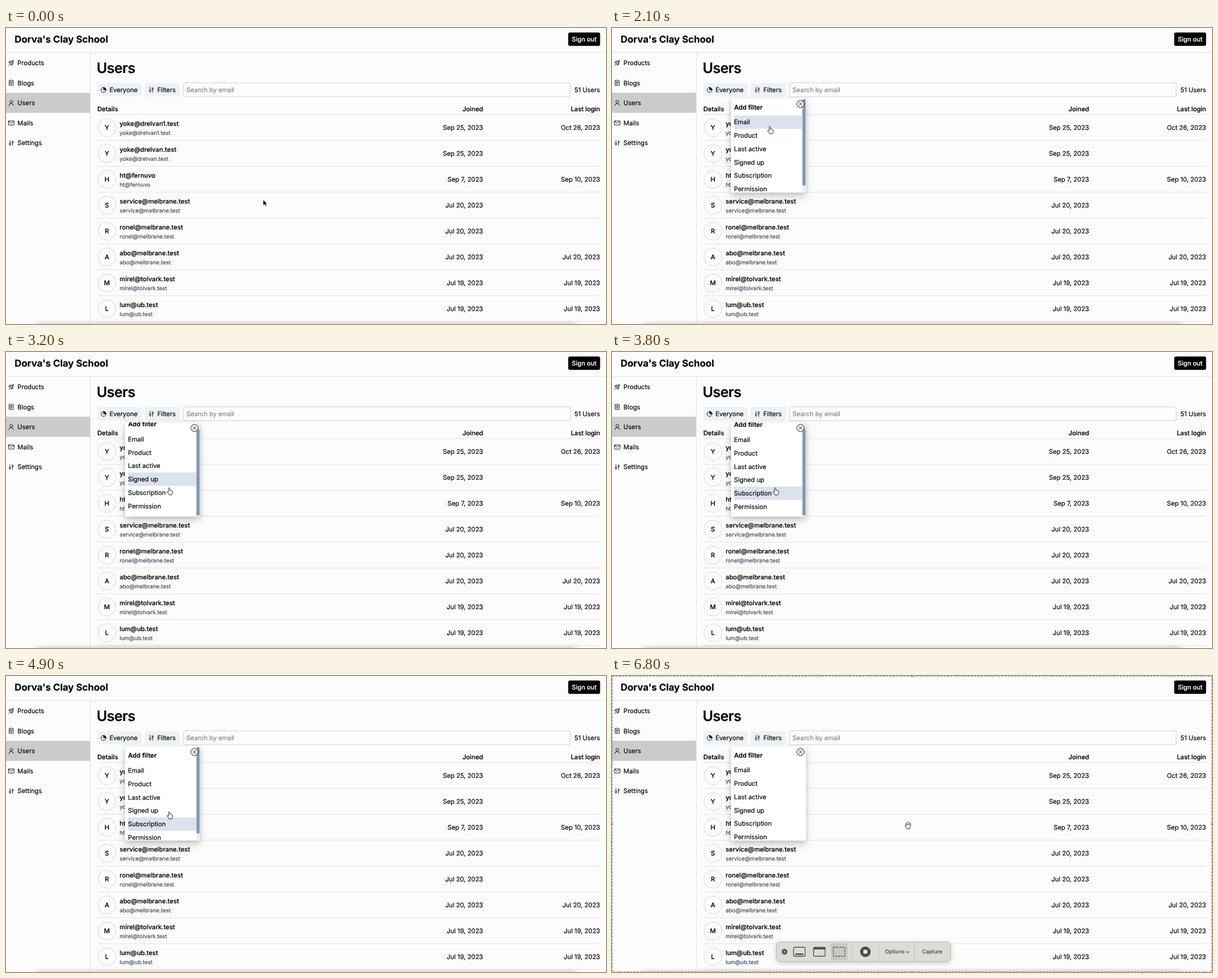
An HTML page for the animation above (7 s loop, 1064x526 px).

```html
<!DOCTYPE html>
<html lang="en">
<head>
<meta charset="utf-8">
<title>User filters</title>
<style>
  html, body { margin: 0; width: 100%; height: 100%; overflow: hidden; background: #fcfcfc; }
  svg { display: block; width: 100vw; height: 100vh; }
  text {
    font-family: Inter, "Open Sans", sans-serif; white-space: pre;
    text-rendering: geometricPrecision; stroke-width: .22;
  }
  .icon { fill: none; stroke: #18181b; stroke-width: 1; stroke-linejoin: round; stroke-linecap: round; }
  .line { stroke: #e2e2e5; stroke-width: 1; }
  .panel { fill: #fff; filter: drop-shadow(0 7px 7px rgba(0,0,0,.17)) drop-shadow(0 1px 3px rgba(0,0,0,.13)); }
  .bottom { fill: #000; opacity: .48; filter: blur(6px); }
  .pointer { fill: #fff; stroke: #111; stroke-width: .9; stroke-linejoin: round; }
  .arrow { fill: #000; stroke: #fff; stroke-width: .8; }
</style>
</head>
<body>
<svg id="stage" viewBox="0 0 1064 526" xmlns="http://www.w3.org/2000/svg"></svg>
<script>
const BASE = 11.26, SMALL = 9.85;
const ROW_TOP = 155.4, ROW_HEIGHT = 23.75;
const LOOP = 7000, STEP = 100;

// y is the middle of the capital letters; a hairline stroke gives the smoothed, slightly heavy look
const text = (x, y, str, { size = BASE, weight = 400, fill = '#09090b', anchor = 'start', tracking = 0 } = {}) =>
  `<text x="${x}" y="${(y + size * .3635).toFixed(2)}" font-size="${size}" font-weight="${weight}" fill="${fill}" stroke="${fill}" text-anchor="${anchor}" letter-spacing="${tracking}em">${str}</text>`;
const rect = (x, y, w, h, fill, extra = '') =>
  `<rect x="${x}" y="${y}" width="${w}" height="${h}" fill="${fill}" ${extra}/>`;
const hline = (x1, x2, y) => `<path class="line" d="M${x1} ${y}H${x2}"/>`;
const icon = (x, y, body) => `<g class="icon" transform="translate(${x} ${y})">${body}</g>`;
const path = d => `<path d="${d}"/>`;

// Icons are centred on 0,0
const sliders = path('M-2.3-4.4V.2M-2.3 3.2V4.4M2.3-4.4V-3M2.3 0V4.4') +
  '<circle cx="-2.3" cy="1.7" r="1.4"/><circle cx="2.3" cy="-1.5" r="1.4"/>';
const icons = {
  rocket: path('M-2.4 1.2Q-.4-4 4.3-4.3 4.3.2-1.2 2.4ZM-1.8-.8-4.4-.4-2.6-3.2-.4-3M.8 1.8.4 4.4 3 2.6 3 .5M-4.4 4.4-2.6 2.8') +
    '<circle cx="1.6" cy="-1.6" r=".8"/>',
  reader: '<rect x="-3.8" y="-4.5" width="7.6" height="9" rx=".8"/>' + path('M-2-2H2M-2 0H2M-2 2H1'),
  person: '<circle cy="-2.1" r="2.5"/>' + path('M-4.2 4.6Q-4 1.2 0 1.2T4.2 4.6'),
  envelope: '<rect x="-5" y="-3.6" width="10" height="7.2" rx=".8"/>' + path('M-4.8-3 0 .6 4.8-3'),
  sliders,
  pie: '<circle r="4.4"/><path d="M0-4.4V0H4.4A4.4 4.4 0 0 0 0-4.4Z" fill="#18181b"/>',
  close: '<circle r="6.5" fill="#fff"/>' + path('M-3-3 3 3M3-3-3 3')
};

const nav = [['Products', 'rocket'], ['Blogs', 'reader'], ['Users', 'person'], ['Mails', 'envelope'], ['Settings', 'sliders']];
const users = [
  ['yoke@drelvan1.test', 'Sep 25, 2023', 'Oct 26, 2023'],
  ['yoke@drelvan.test', 'Sep 25, 2023', ''],
  ['ht@fernuvo', 'Sep 7, 2023', 'Sep 10, 2023'],
  ['service@melbrane.test', 'Jul 20, 2023', ''],
  ['ronel@melbrane.test', 'Jul 20, 2023', ''],
  ['abo@melbrane.test', 'Jul 20, 2023', 'Jul 20, 2023'],
  ['mirel@tolvark.test', 'Jul 19, 2023', 'Jul 19, 2023'],
  ['lum@ub.test', 'Jul 19, 2023', 'Jul 19, 2023']
];
const filters = ['Email', 'Product', 'Last active', 'Signed up', 'Subscription', 'Permission'];

const medium = { weight: 500 };
const right = { anchor: 'end' };

const header = text(15.3, 20, "Dorva's Clay School", { size: 16.9, weight: 700 }) +
  rect(997, 8, 56.5, 23.7, '#000', 'rx="3"') +
  text(1025.3, 20, 'Sign out', { weight: 500, fill: '#fff', anchor: 'middle' }) +
  hline(0, 1064, 43.5);

const sidebar = rect(0, 115, 149, 35.7, '#cbcbcb') +
  '<path class="line" d="M149.5 43V526"/>' +
  nav.map(([label, name], i) => {
    const y = 62 + 35.6 * i;
    return icon(9.3, y, icons[name]) + text(20.3, y, label);
  }).join('');

const toolbar = text(160.8, 71, 'Users', { size: 25.3, weight: 600, tracking: -.025 }) +
  rect(162, 98, 78.5, 24, '#eef2f7', 'rx="3"') + icon(173, 110, icons.pie) + text(183.5, 110, 'Everyone') +
  rect(246, 98, 62.5, 24, '#eef2f7', 'rx="3" id="filterButton"') + icon(257.7, 110, sliders) + text(268.3, 110, 'Filters') +
  rect(314.5, 97.5, 686, 24.5, '#fdfdfd', 'rx="2" stroke="#cfd0d4"') +
  text(320, 110, 'Search by email', { fill: '#85868c' }) + text(1053.5, 110, '51 Users', right);

const table = text(162, 144, 'Details', medium) +
  text(846, 144, 'Joined', { ...medium, ...right }) + text(1053.5, 144, 'Last login', { ...medium, ...right }) +
  hline(162, 1054, 153.8) +
  users.map(([mail, joined, login], i) => {
    const y = 177 + 46 * i;
    return `<circle cx="179" cy="${y}" r="16" fill="none" stroke="#d9d9dd"/>` +
      text(179, y, mail[0].toUpperCase(), { weight: 500, anchor: 'middle' }) +
      text(201.5, y - 7, mail, medium) + text(201.5, y + 9, mail, { size: SMALL, fill: '#475066' }) +
      text(846, y, joined, right) + text(1053.5, y, login, right) + hline(162, 1054, y + 22.8);
  }).join('') + rect(50, 529, 964, 20, '#000', 'class="bottom" rx="10"');

const menu = `<g id="menu"><clipPath id="menuClip"><rect x="211" y="125" width="133" height="167.5"/></clipPath>
  ${rect(211, 125, 133, 167.5, '#fff', 'class="panel" rx="1"')}
  <g clip-path="url(#menuClip)">
    <g id="list">${rect(216.5, ROW_TOP, 121, ROW_HEIGHT, '#dce2ed', 'id="highlight"')}
      ${text(216.5, 140.5, 'Add filter', { weight: 600 })}
      ${filters.map((label, i) => text(216.3, 167.3 + ROW_HEIGHT * i, label)).join('')}</g>
    <g id="scrollbar">${rect(337.5, 126, 6.5, 166.5, '#eaeff6')}${rect(337.7, 126.5, 5.6, 153.5, '#8497b3', 'rx="2" id="thumb"')}</g>
  </g>${icon(334.3, 135, icons.close)}</g>`;

const dark = '#4c4c4c';
const label = { size: 9.5, fill: dark };
const divider = x => `<path d="M${x} 473V507" stroke="#c4c2c0"/>`;
const handle = (x, y) => `<circle cx="${x}" cy="${y}" r="2" fill="#8a8a8a"/>`;
const recorder = `<g id="recorder">
  <rect x=".5" y=".5" width="1063" height="525" fill="none" stroke="#777" stroke-dasharray="3 3"/>
  ${handle(532, 0)}${handle(532, 526)}${handle(0, 263)}${handle(1064, 263)}
  ${rect(291.5, 472.5, 309, 35, '#dddbd8', 'rx="7" stroke="#bbb9b6" style="filter:drop-shadow(0 2px 4px rgba(0,0,0,.2))"')}
  ${rect(388, 475, 30, 30, '#c9c7c4', 'rx="4"')}
  <circle cx="306" cy="490" r="5" fill="${dark}"/><path d="M304 488l4 4m0-4l-4 4" stroke="#e4e2df"/>
  <g fill="none" stroke="${dark}" stroke-width="1.3">
    <rect x="322" y="482" width="20.5" height="16" rx="2"/><path d="M325 494.3H339.5" stroke-width="2.6"/>
    <rect x="357.5" y="482" width="20.5" height="16" rx="2"/><path d="M358 484.5H378" stroke-width="3"/>
    <rect x="392.5" y="482" width="20.5" height="16" rx="1" stroke-dasharray="3 1.8"/>
    <path d="M521.5 489.5l2.5 2 2.5-2"/>
  </g>
  ${divider(426)}${divider(473)}${divider(536.5)}
  <circle cx="449.3" cy="490" r="9.3" fill="${dark}"/>${rect(445.8, 486.5, 7, 7, '#e8e6e3', 'rx="1"')}
  ${text(484, 490, 'Options', label)}${text(550, 490, 'Capture', label)}</g>`;

const cursors = `<g id="cursor">
  <path id="arrow" class="arrow" d="M0 0V10.5L2.4 8.3 4.1 12.1 6 11.3 4.3 7.6H7.4Z"/>
  <path id="finger" class="pointer" d="M-1.2 .9A1.1 1.1 0 0 1 1 .9V4L4.6 4.9Q6.2 5.3 6.1 6.9L5.8 9.3Q5.6 10.6 4.8 11.5V12.5H-.6V11.5L-3.6 7.8Q-4.5 6.6-3.4 6.2-2.6 6-1.8 6.8L-1.2 7.4Z"/>
  <g id="palm" class="pointer" transform="translate(0 6)"><path d="M-3.8-3.2Q-3.6-4.8-2.2-4.6-1.9-5.8-.6-5.7.3-6.4 1.4-5.4 2.9-5.9 3.4-4.4 4.9-4.4 4.8-2.6 4.8 0 3.8 1.8L3 5.6H-2L-4.8 1.6Q-5.8.2-4.4-.2-3.6-.3-3 .5Z"/><path d="M-1.6-3.6V-1M.6-4V-1M2.7-3.4V-1"/></g>
</g>`;

const stage = document.getElementById('stage');
stage.innerHTML = rect(0, 0, 1064, 526, '#fcfcfc') + header + sidebar + toolbar + table + menu + recorder + cursors;
const $ = id => document.getElementById(id);
const show = (id, on) => $(id).style.display = on ? '' : 'none';

// Eased interpolation through [time, ...values] stops
function follow(stops, t) {
  if (t <= stops[0][0]) return stops[0].slice(1);
  const next = stops.findIndex(s => s[0] > t);
  if (next < 0) return stops[stops.length - 1].slice(1);
  const a = stops[next - 1], b = stops[next];
  const p = (t - a[0]) / (b[0] - a[0]), e = p * p * (3 - 2 * p);
  return a.slice(1).map((v, i) => v + (b[i + 1] - v) * e);
}

const cursorPath = [
  [100, 456, 305], [700, 265.5, 112], [1300, 265.5, 112], [2100, 280, 175.5],
  [2900, 289.5, 241.5], [5600, 289.5, 241.5], [6400, 525, 260]
];
const scrollPath = [[3000, 0], [3200, 12.5], [3500, 11.3], [4600, 11.3], [4900, -.8], [5200, 0]];

function render(t) {
  const [x, y] = follow(cursorPath, t);
  const [scroll] = follow(scrollPath, t);
  const open = t >= 1300;
  const recording = t >= 6600;
  const onButton = x > 246 && x < 308 && y > 98 && y < 122;

  // Hover only catches up once scrolling has rested
  const hoverScroll = t >= 3500 && t < 5600 ? 11.3 : 0;
  const row = Math.floor((y + hoverScroll - ROW_TOP) / ROW_HEIGHT);
  const onRow = open && x > 211 && x < 338 && row >= 0 && row < filters.length;

  $('filterButton').setAttribute('fill', onButton ? '#c2c9d7' : '#eef2f7');
  show('menu', open);
  show('highlight', onRow);
  $('highlight').setAttribute('y', ROW_TOP + ROW_HEIGHT * row);
  $('list').setAttribute('transform', `translate(0 ${-scroll})`);
  $('thumb').setAttribute('y', 126.5 + Math.min(10.5, Math.max(0, scroll * .93)));
  show('scrollbar', !recording);

  show('recorder', recording);
  $('recorder').style.opacity = Math.min(1, .4 + (t - 6600) / 330);

  show('palm', recording);
  show('finger', !recording && (onButton || onRow));
  show('arrow', !recording && !onButton && !onRow);
  $('cursor').setAttribute('transform', `translate(${x} ${y})`);
}

const start = performance.now();
function tick() {
  const t = (performance.now() - start) % LOOP;
  render(Math.floor(t / STEP) * STEP);
  requestAnimationFrame(tick);
}
tick();
</script>
</body>
</html>
```
